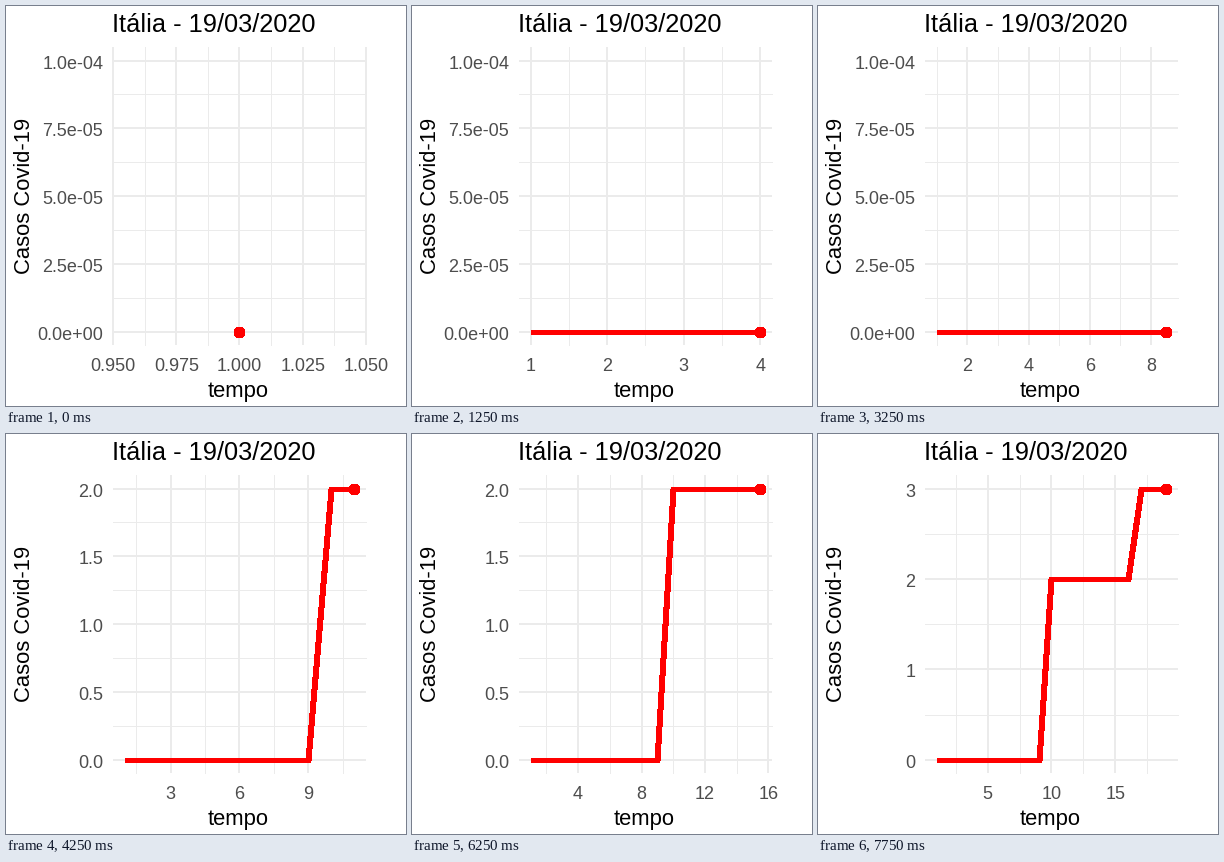
Write a matplotlib script that moves like this. It is 400 px wide and 400 px high and loops after 8000 ms.

```python
import math
from itertools import product

import numpy as np
import matplotlib.pyplot as plt
from matplotlib.animation import FuncAnimation
from matplotlib.patches import Circle

SIZE, DPI = 400, 100
PX = 72 / DPI  # points per pixel
FRAMES, INTERVAL = 32, 250

LEFT, RIGHT, TOP, BOTTOM = 107.08, 359.9, 41.0, 339.3
GRID, TICK, RED = "#EBEBEB", "#4D4D4D", "#FF0000"

DAYS = np.arange(1, 21)
CASES = np.where(DAYS < 10, 0, np.where(DAYS < 17, 2, 3))
# Each day lands on a whole frame; frames in between are interpolated.
DAY_FRAMES = np.round((DAYS - 1) * 99 / 57)

plt.rcParams["font.family"] = "Liberation Sans"
fig = plt.figure(figsize=(SIZE / DPI, SIZE / DPI), dpi=DPI, facecolor="white")
ax = fig.add_axes([0, 0, 1, 1])


def nice_breaks(lo, hi, m=5):
    """Extended Wilkinson breaks, kept to those inside lo..hi."""
    nice = [1, 5, 2, 2.5, 4, 3]
    span = hi - lo
    best, found = -math.inf, (lo, span, 2)
    for j, (i, q), k in product((1, 2, 3), enumerate(nice), range(2, 12)):
        z0 = math.ceil(math.log10(span / (k + 1) / j / q))
        for z in (z0, z0 + 1):
            step = j * q * 10.0 ** z
            first = (math.floor(hi / step) - (k - 1)) * j
            last = math.ceil(lo / step) * j
            for start in range(first, last + 1):
                a = start * step / j
                b = a + step * (k - 1)
                has_zero = start % j == 0 and a <= 0 <= b
                simple = 1 - i / (len(nice) - 1) - j + has_zero
                cover = 1 - 0.5 * ((hi - b) ** 2 + (lo - a) ** 2) / (0.1 * span) ** 2
                r = (k - 1) / (b - a)
                rt = (m - 1) / (max(b, hi) - min(a, lo))
                dense = 2 - max(r / rt, rt / r)
                score = 0.25 * simple + 0.2 * cover + 0.5 * dense + 0.05
                if score > best + 1e-12:
                    best, found = score, (a, step, k)
    a, step, k = found
    tol = span * 1e-6
    values = [round(a + n * step, 12) for n in range(k)]
    return [v for v in values if lo - tol <= v <= hi + tol]


def minor_breaks(major, lo, hi):
    step = major[1] - major[0]
    mids = [major[0] - step / 2] + [v + step / 2 for v in major]
    return [v for v in mids if lo <= v <= hi]


def labels(values):
    if max(values) < 1e-3:
        return [f"{v:.1e}" for v in values]
    digits = next(d for d in range(8)
                  if all(abs(round(v, d) - v) < 1e-9 for v in values))
    return [f"{v:.{digits}f}" for v in values]


def expand(lo, hi):
    if hi == lo:
        return lo - 0.05, hi + 0.05
    pad = 0.05 * (hi - lo)
    return lo - pad, hi + pad


def text(x, y, s, px, color="black", **kw):
    ax.text(x, y, s, fontsize=px * PX, color=color, va="baseline", **kw)


def line(xs, ys, width, color, **kw):
    ax.plot(xs, ys, color=color, lw=width * PX, antialiased=False,
            solid_capstyle="butt", solid_joinstyle="round", **kw)


def pixel(v):
    """Centre of the pixel at the rounded coordinate."""
    return np.floor(v + 0.5) + 0.5


def draw(frame):
    ax.clear()
    ax.set(xlim=(0, SIZE), ylim=(SIZE, 0))
    ax.axis("off")

    day = np.interp(frame, DAY_FRAMES, DAYS)
    cases = np.interp(frame, DAY_FRAMES, CASES)
    past = DAY_FRAMES < frame
    xs = np.append(DAYS[past], day)
    ys = np.append(CASES[past], cases)

    x0, x1 = expand(1, day)
    y0, y1 = expand(0, max(cases, 1e-4))

    def to_x(v):
        return LEFT + (np.asarray(v) - x0) / (x1 - x0) * (RIGHT - LEFT)

    def to_y(v):
        return BOTTOM - (np.asarray(v) - y0) / (y1 - y0) * (BOTTOM - TOP)

    x_major, y_major = nice_breaks(x0, x1), nice_breaks(y0, y1)
    x_minor, y_minor = minor_breaks(x_major, x0, x1), minor_breaks(y_major, y0, y1)
    for xv, yv, width in ((x_minor, y_minor, 1), (x_major, y_major, 2)):
        for y in to_y(yv):
            line([LEFT, RIGHT], [y, y], width, GRID)
        for x in to_x(xv):
            line([x, x], [TOP, BOTTOM], width, GRID)

    px, py = pixel(to_x(xs)), pixel(to_y(ys))
    if len(px) > 1:
        line(px, py, 5, RED, snap=False)
    ax.add_patch(Circle((px[-1], py[-1]), 5.5, color=RED, lw=0,
                        antialiased=False, snap=False, zorder=3))

    for x, s in zip(to_x(x_major), labels(x_major)):
        text(x, 365, s, 18, TICK, ha="center")
    for y, s in zip(to_y(y_major), labels(y_major)):
        text(97.2, y + 8, s, 18, TICK, ha="right")

    text(106, 26, "Itália - 19/03/2020", 25.4)
    text(232.5, 390.5, "tempo", 22, ha="center")
    text(24, 189.5, "Casos Covid-19", 22, ha="center",
         rotation=90, rotation_mode="anchor")
    return []


anim = FuncAnimation(fig, draw, frames=FRAMES, init_func=lambda: [],
                     interval=INTERVAL, repeat=True, repeat_delay=0)
plt.show()
```
